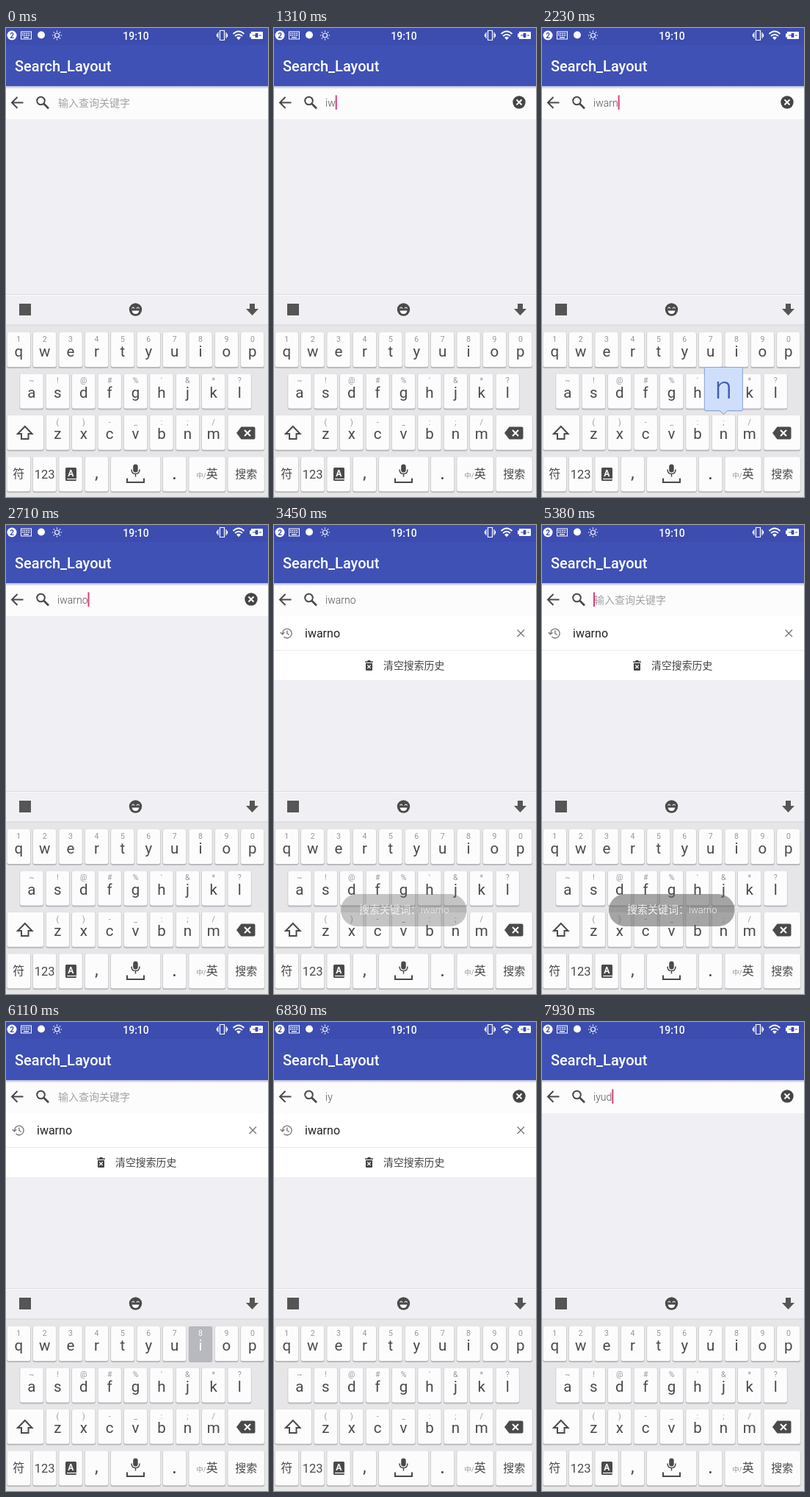
Write an HTML page that moves like this. It is 357 by 638 pixels and loops after 8000 ms.

```html
<!DOCTYPE html>
<html lang="zh">
<head>
<meta charset="utf-8">
<title>Search_Layout</title>
<style>
html, body { margin: 0; width: 100%; height: 100%; overflow: hidden; background: #f0eff4; }
svg { display: block; width: 357px; height: 638px; }
text { font-family: Roboto, "Noto Sans CJK SC", "Noto Sans CJK", sans-serif; }
.line { fill: none; stroke: #484848; stroke-width: 2; }
.white { fill: none; stroke: #fff; stroke-width: 1.2; }
.key rect { fill: #fcfcfd; }
.key .shade { fill: #b9babd; }
.key text { fill: #4a4a4c; text-anchor: middle; }
.key .hint { fill: #97979a; font-size: 10.5px; }
.key.down rect { fill: #b7b9bf; }
.key.down text { fill: #fff; }
</style>
</head>
<body>
<svg viewBox="0 0 357 638" xmlns="http://www.w3.org/2000/svg">
  <defs>
    <linearGradient id="drop" x2="0" y2="1">
      <stop stop-color="#b5b9d4"/><stop offset="1" stop-color="#fcfcfd"/>
    </linearGradient>
  </defs>
  <rect width="357" height="638" fill="#f0eff4"/>

  <!-- status bar -->
  <rect width="357" height="80" fill="#3f51b5"/>
  <rect width="357" height="23" fill="#3c4daf"/>
  <circle cx="8" cy="10" r="6.5" fill="#fff"/>
  <text x="8" y="13.7" font-size="10" font-weight="700" text-anchor="middle" fill="#3c4daf">2</text>
  <rect x="20.5" y="5" width="14" height="10" fill="none" stroke="#fff"/>
  <path d="M22 7.5h11M22 10h11" stroke="#fff" stroke-width="1.4" stroke-dasharray="1.6 1"/>
  <path d="M24 12.8h7" stroke="#fff" stroke-width="1.3"/>
  <circle cx="48" cy="9.5" r="5" fill="#fff"/>
  <circle cx="69.500" cy="10" r="3" class="white"/>
  <path id="rays" class="white"/>
  <text x="177" y="15.500" font-size="14" font-weight="500" text-anchor="middle" fill="#fff">19:10</text>
  <path class="white" d="M291.500 3.500h6v13h-6zM289 6v8M300 6v8M287.500 8v4M301.500 8v4"/>
  <path class="white" stroke-width="2" style="stroke-width:1.8" d="M309.500 8q7.500-7 15 0M312 11q5-4.500 10 0"/>
  <path d="M314 13q3-2.500 6 0l-3 3.200z" fill="#fff"/>
  <path d="M334 5h15a1 1 0 0 1 1 1v8a1 1 0 0 1-1 1h-15v-2.500h-2v-5h2z" fill="#fff"/>
  <path d="M336 10h4M345 10h3M340 7.500h3v5h-3z" stroke="#3c4daf" fill="#3c4daf"/>
  <text x="12" y="59" font-size="20" font-weight="500" fill="#fff">Search_Layout</text>

  <!-- search row -->
  <rect y="79" width="357" height="45" fill="#fcfcfd"/>
  <rect y="79" width="357" height="4" fill="url(#drop)"/>
  <path class="line" d="M23.500 101.500H8M15.500 94l-7.500 7.500 7.500 7.500"/>
  <circle class="line" cx="47.500" cy="99" r="5.300"/>
  <path class="line" style="stroke-width:2.600" d="M51.500 103l6.500 6.500"/>
  <text id="hint" x="71" y="106.500" font-size="14" fill="#a3a3a6">输入查询关键字</text>
  <text id="query" x="70" y="106.700" font-size="14" font-weight="300" fill="#555"></text>
  <rect id="cursor" y="91.500" width="2" height="19.500" fill="#e33a78"/>
  <g id="clear">
    <circle cx="334" cy="101" r="8.700" fill="#454545"/>
    <path d="M330.500 97.500l7 7m0-7l-7 7" stroke="#fff" stroke-width="2"/>
  </g>

  <!-- history -->
  <g id="list">
    <rect y="124" width="357" height="87" fill="#fff"/>
    <path d="M0 170.500h357" stroke="#ebebed"/>
    <path class="line" style="stroke:#777;stroke-width:1.400" d="M11.500 147.500a6.300 6.300 0 1 1 2 4.600M8.700 146l2.800 2.700 2.800-2.700M17.800 143.500v4l3 2"/>
    <text x="42" y="153" font-size="16" fill="#222">iwarno</text>
    <path d="M331.500 142.500l9.500 9.500m0-9.500l-9.500 9.500" stroke="#777" stroke-width="1.400"/>
    <path d="M124 185.500h3l1-1.500h3l1 1.500h3v1.500h-11zM125 188h9v9q0 1-1 1h-7q-1 0-1-1z" fill="#444"/>
    <path d="M127.300 190.500l4.400 4.600m0-4.600l-4.400 4.600" stroke="#fff" stroke-width="1.200"/>
    <text x="149" y="196.300" font-size="13.900" fill="#444">清空搜索历史</text>
  </g>

  <!-- keyboard -->
  <rect y="362" width="357" height="42" fill="#f0eff4"/>
  <path d="M0 362.500h357" stroke="#dcdce0"/>
  <path d="M0 363.500h357" stroke="#fafafc"/>
  <rect y="404" width="357" height="234" fill="#e6e6e8"/>
  <path d="M0 404h357" stroke="#d3d3d6"/>
  <rect x="18" y="375" width="16" height="16" fill="#555"/>
  <circle cx="176.500" cy="383" r="8.700" fill="#4a4a4a"/>
  <path d="M171.500 381.500q1.800-3 3.600 0M178 381.500q1.800-3 3.600 0" class="white"/>
  <path d="M171.500 384.500h10q-1 4.500-5 4.500t-5-4.500z" fill="#fff"/>
  <path d="M332 375h7v7h5l-8.500 9-8.500-9h5z" fill="#555"/>
  <g id="keys"></g>
  <path d="M25.800 542l9.700 10h-5v7h-9.500v-7h-5z" class="line" style="stroke:#4a4a4a"/>
  <path d="M314 551l6.500-8.500h17q2 0 2 2v13q0 2-2 2h-17z" fill="#4a4a4a"/>
  <path d="M325 547l8 8m0-8l-8 8" stroke="#fff" stroke-width="2"/>
  <rect x="81" y="598" width="15" height="18" rx="1.500" fill="#4a4a4a"/>
  <path d="M83 613.500h13" stroke="#fff" stroke-width="1.200"/>
  <text x="88.300" y="610" font-size="12" font-weight="700" text-anchor="middle" fill="#fff">A</text>
  <rect x="173.200" y="593.500" width="6.500" height="11" rx="3.200" fill="#4a4a4a"/>
  <path class="line" style="stroke-width:1.500" d="M171 600.500q0 6 5.500 6t5.500-6M176.500 606.500v4"/>
  <path class="line" d="M165 612.500v5.500h23v-5.500"/>

  <g id="popup">
    <path d="M-24 1h48q2 0 2 2v54q0 2-2 2h-19l-5 5-5-5h-19q-2 0-2-2v-54q0-2 2-2z" fill="#999ca5" opacity=".5" transform="translate(0 1)"/>
    <path d="M-24 0h48q2 0 2 2v55q0 2-2 2h-19l-5 5-5-5h-19q-2 0-2-2v-55q0-2 2-2z" fill="#cfdffb" stroke="#86a3d8"/>
    <text id="big" y="42" font-size="43" font-weight="300" text-anchor="middle" fill="#3f60ad"></text>
  </g>

  <g id="toast">
    <rect x="91" y="502" width="171.500" height="44" rx="22" fill="#5c5c5c"/>
    <text x="116" y="528" font-size="14" font-weight="300" fill="#fff">搜索关键词：</text>
    <text x="200" y="528" font-size="13" font-weight="300" fill="#fff">iwarno</text>
  </g>
</svg>
<script>
const LOOP = 8000;
const $ = id => document.getElementById(id);
const keys = {};

function add(parent, tag, attrs, text = '') {
  const el = document.createElementNS('http://www.w3.org/2000/svg', tag);
  for (const name in attrs) el.setAttribute(name, attrs[name]);
  el.textContent = text;
  parent.append(el);
  return el;
}

function addKey(x, y, w, label, size, dy, hint = '') {
  const g = add($('keys'), 'g', { class: 'key' });
  const cx = x + w / 2;
  add(g, 'rect', { class: 'shade', x: x - .5, y: y, width: w + 1, height: 49, rx: 3 });
  add(g, 'rect', { x, y, width: w, height: 47, rx: 2.5 });
  if (hint) add(g, 'text', { class: 'hint', x: cx, y: y + 13 }, hint);
  const text = add(g, 'text', { x: cx, y: y + dy, 'font-size': size }, label);
  if (label) keys[label] = { g, cx, y };
  return text;
}

const PITCH = 35.4;
[
  ['qwertyuiop', '1234567890', 1.5],
  ['asdfghjkl', "~!@#%'&*?", 19.2],
  ['zxcvbnm', '()-_:;/', 54.6]
].forEach(([letters, hints, x0], row) =>
  [...letters].forEach((c, i) =>
    addKey(x0 + i * PITCH, 414 + row * 56.4, 31.5, c, 20.5, 32.5, hints[i])));

addKey(1.5, 526.8, 49.5, '', 0, 0);
addKey(302.4, 526.8, 49.5, '', 0, 0);
addKey(1.5, 583.2, 31.5, '符', 16, 29);
addKey(36.9, 583.2, 31.5, '123', 16.5, 29.5);
addKey(72.3, 583.2, 31.5, '', 0, 0);
addKey(107.7, 583.2, 31.5, ',', 24, 30);
addKey(143, 583.2, 67.5, '', 0, 0);
addKey(213.9, 583.2, 31.5, '.', 27, 31);
const lang = addKey(249.3, 583.2, 49.5, '', 16, 29);
add(lang, 'tspan', { 'font-size': 9.5, fill: '#97979a' }, '中/');
add(lang, 'tspan', {}, '英');
addKey(302.4, 583.2, 49.5, '搜索', 15, 29);

let rays = '';
for (let i = 0; i < 8; i++) {
  const c = Math.cos(i * Math.PI / 4), s = Math.sin(i * Math.PI / 4);
  rays += `M${69.5 + 4.8 * c} ${10 + 4.8 * s}l${1.8 * c} ${1.8 * s}`;
}
$('rays').setAttribute('d', rays);

// Each step changes part of the state from its time on.
const steps = [
  [0, { text: '', key: '', cursor: 0, focus: 1, list: 0 }],
  [140, { cursor: 1 }],
  [700, { cursor: 0 }],
  [890, { key: 'i' }],
  [1000, { key: '', text: 'i', cursor: 1 }],
  [1250, { key: 'w' }],
  [1310, { key: '', text: 'iw' }],
  [1560, { key: 'a' }],
  [1620, { text: 'iwa' }],
  [1680, { key: '' }],
  [1860, { key: 'r' }],
  [1930, { key: '', text: 'iwar' }],
  [2170, { key: 'n' }],
  [2230, { text: 'iwarn' }],
  [2280, { key: '' }],
  [2590, { key: 'o' }],
  [2650, { text: 'iwarno' }],
  [2710, { key: '' }],
  [3140, { key: '搜索' }],
  [3210, { key: '' }],
  [3270, { focus: 0, list: 1 }],
  [4660, { focus: 1, cursor: 1 }],
  [5080, { cursor: 0 }],
  [5320, { text: '', cursor: 1 }],
  [5680, { cursor: 0 }],
  [6110, { key: 'i' }],
  [6170, { text: 'i', cursor: 1 }],
  [6230, { key: '' }],
  [6290, { key: 'y' }],
  [6350, { text: 'iy' }],
  [6400, { key: '' }],
  [6830, { cursor: 0 }],
  [7010, { key: 'u' }],
  [7070, { key: '', text: 'iyu', list: 0, cursor: 1 }],
  [7630, { cursor: 0 }],
  [7750, { key: 'd' }],
  [7840, { text: 'iyud', cursor: 1 }],
  [7930, { key: '' }]
];

const clamp = v => Math.max(0, Math.min(1, v));
const show = (id, on) => { $(id).style.visibility = on ? 'visible' : 'hidden'; };

function render(t) {
  const s = {};
  for (const [at, change] of steps) if (at <= t) Object.assign(s, change);

  $('query').textContent = s.text;
  const width = s.text ? $('query').getComputedTextLength() : 0;
  $('cursor').setAttribute('x', 70 + width);
  show('cursor', s.cursor && s.focus);
  show('hint', !s.text);
  show('clear', s.text && s.focus);
  show('list', s.list);

  // Letters of the lower rows pop up; other keys turn grey.
  const key = keys[s.key];
  const pops = key && s.key.length === 1 && key.y > 420;
  for (const name in keys) keys[name].g.classList.toggle('down', name === s.key && !pops);
  show('popup', pops);
  if (pops) {
    $('big').textContent = s.key;
    $('popup').setAttribute('transform', `translate(${key.cx} ${key.y - 65.3})`);
  }

  $('toast').style.opacity = Math.min(clamp((t - 3300) / 440), clamp((5500 - t) / 220));
}

const start = performance.now();
function frame() {
  render((performance.now() - start) % LOOP);
  requestAnimationFrame(frame);
}
frame();
</script>
</body>
</html>
```
